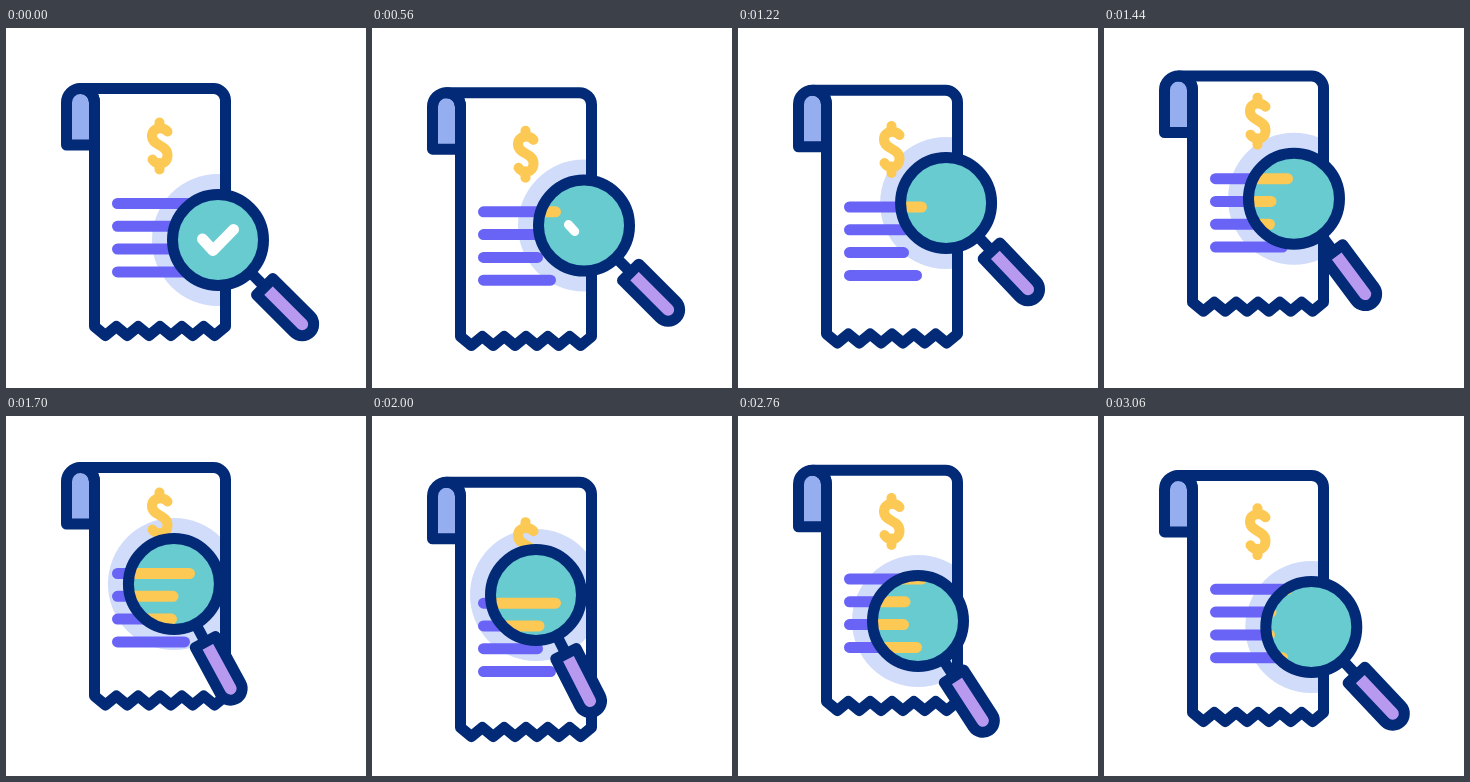
An HTML page with a canvas for the animation above (3.08 s loop, 360 by 360 pixels).

```html
<!DOCTYPE html>
<html lang="en">
<head>
<meta charset="utf-8">
<title>Receipt check</title>
<style>
html, body { margin: 0; width: 100%; height: 100%; overflow: hidden; background: #fff; }
canvas { display: block; width: 360px; height: 360px; }
</style>
</head>
<body>
<canvas id="stage"></canvas>
<script>
const LOOP = 3080, HOLD = 100, STEP = 20;
const NAVY = '#022a76', PURPLE = '#6a64f6', YELLOW = '#fdc955', TEAL = '#67cbd0',
      HALO = '#d1dcfb', ROLL = '#94aef0', GRIP = '#b79af0';

const canvas = document.getElementById('stage');
const ctx = canvas.getContext('2d');
const dpr = window.devicePixelRatio || 1;
canvas.width = canvas.height = 360 * dpr;

// Smooth curve through [time, value] keys without overshoot
function curve(keys) {
  const n = keys.length;
  const sec = keys.slice(1).map((k, i) => (k[1] - keys[i][1]) / (k[0] - keys[i][0]));
  const tan = keys.map((k, i) => {
    if (i === 0) return 0;
    if (i === n - 1) return sec[i - 1];
    const a = sec[i - 1], b = sec[i];
    return a * b <= 0 ? 0 : 2 * a * b / (a + b);
  });
  return t => {
    if (t <= keys[0][0]) return keys[0][1];
    if (t >= keys[n - 1][0]) return keys[n - 1][1];
    let i = 0;
    while (t > keys[i + 1][0]) i++;
    const h = keys[i + 1][0] - keys[i][0], u = (t - keys[i][0]) / h, v = 1 - u;
    return keys[i][1] * (1 + 2 * u) * v * v + tan[i] * h * u * v * v
         + keys[i + 1][1] * u * u * (3 - 2 * u) - tan[i + 1] * h * u * u * v;
  };
}

const clamp = u => Math.max(0, Math.min(1, u));
const sine = (t, a, b) => (1 - Math.cos(Math.PI * clamp((t - a) / (b - a)))) / 2;

// Bobbing of the print and of the torn edge
const printY = curve([[100, 0], [620, 10], [950, 28.5], [1220, 3.5], [1520, -29], [1700, -18],
  [2040, 12.5], [2300, 5], [2700, -13.5], [2760, -12.5], [3060, -2.2], [3080, -1]]);
const edgeY = curve([[100, 0], [620, 12], [950, 36], [1220, 7.5], [1520, -29], [1700, -18.5],
  [2040, 14], [2300, 4.5], [2700, -14], [2760, -13], [3060, -2], [3080, -1]]);
const lensY = curve([[100, 212], [900, 183], [1220, 175], [1700, 168], [2300, 196],
  [2470, 202], [2760, 205], [3060, 211], [3080, 211.5]]);
const lensSwing = t => sine(t, 1080, 1840) - sine(t, 2470, 3210);

function stroke(color, width, path) {
  ctx.strokeStyle = color;
  ctx.lineWidth = width;
  ctx.stroke(path);
}

function fill(color, path) {
  ctx.fillStyle = color;
  ctx.fill(path);
}

function disc(x, y, r) {
  const p = new Path2D();
  p.arc(x, y, r, 0, Math.PI * 2);
  return p;
}

function paperPath(top, edge) {
  const p = new Path2D();
  p.moveTo(74.5, 60.5 + top);
  p.lineTo(207.5, 60.5 + top);
  p.arcTo(219.5, 60.5 + top, 219.5, 72.5 + top, 12);
  for (let i = 12; i >= 0; i--)
    p.lineTo(88.5 + i * 131 / 12, (i % 2 ? 307.5 : 298.5) + edge);
  p.lineTo(88.5, 74.5 + top);
  p.arc(74.5, 74.5 + top, 14, 0, -Math.PI / 2, true);
  p.closePath();
  return p;
}

function rollPath(top) {
  const p = new Path2D();
  p.moveTo(88.5, 117 + top);
  p.lineTo(60.5, 117 + top);
  p.lineTo(60.5, 74.5 + top);
  p.arc(74.5, 74.5 + top, 14, Math.PI, 0);
  p.closePath();
  return p;
}

const rows = new Path2D();
[189, 172.5, 171, 184].forEach((end, i) => {
  rows.moveTo(111.5, 175.5 + i * 22.8);
  rows.lineTo(end - 5.5, 175.5 + i * 22.8);
});

const dollar = new Path2D('M161.5 103.5C157 98.5 146 99 146 108C146 118 161.5 116.5 161.5 127'
  + 'C161.5 137.5 150 137.5 146.5 131.5M153.5 94.5V100M153.5 135V141.5');

const grip = new Path2D();
grip.moveTo(66, -11.5);
grip.lineTo(119, -11.5);
grip.arc(119, 0, 11.5, -Math.PI / 2, Math.PI / 2);
grip.lineTo(66, 11.5);
grip.closePath();

const neck = new Path2D('M48 0H64');
const tick = new Path2D('M-15.5 -1L-5 10.5L15.5 -10.5');

function drawRows(color, y) {
  ctx.save();
  ctx.translate(0, y);
  stroke(color, 11, rows);
  ctx.restore();
}

function drawPaper(y, edge, x, ly) {
  const top = y / 2, paper = paperPath(top, edge), roll = rollPath(top);
  fill('#fff', paper);
  ctx.save();
  ctx.clip(paper);
  fill(HALO, disc(x, ly, 66));
  ctx.restore();
  fill(ROLL, roll);
  drawRows(PURPLE, y);
  ctx.save();
  ctx.translate(0, y);
  stroke(YELLOW, 10, dollar);
  ctx.restore();
  stroke(NAVY, 11, paper);
  stroke(NAVY, 11, roll);
}

function drawLens(t, x, y, turn, rowsY) {
  ctx.save();
  ctx.translate(x, y);
  ctx.rotate(Math.PI / 4 + turn);
  stroke(NAVY, 11, neck);
  fill(GRIP, grip);
  stroke(NAVY, 11, grip);
  ctx.restore();

  const glass = disc(x, y, 45.5);
  fill(TEAL, glass);
  ctx.save();
  ctx.clip(glass);
  drawRows(YELLOW, rowsY);
  ctx.restore();
  stroke(NAVY, 11, glass);

  const left = 1 - sine(t, 350, 650);
  if (left > 0) {
    ctx.save();
    ctx.translate(x, y);
    ctx.setLineDash([45 * left, 100]);
    stroke('#fff', 11 * Math.min(1, left * 4), tick);
    ctx.restore();
  }
}

function draw(t) {
  ctx.setTransform(dpr, 0, 0, dpr, 0, 0);
  ctx.fillStyle = '#fff';
  ctx.fillRect(0, 0, 360, 360);
  ctx.lineCap = ctx.lineJoin = 'round';
  const swing = lensSwing(t), x = 212 - 48 * swing, y = lensY(t), rowsY = printY(t);
  drawPaper(rowsY, edgeY(t), x, y);
  drawLens(t, x, y, swing * 18 * Math.PI / 180, rowsY);
}

const start = performance.now();
function frame() {
  const t = Math.max(0, performance.now() - start) % LOOP;
  draw(t < HOLD ? 0 : Math.floor(t / STEP) * STEP);
  requestAnimationFrame(frame);
}
frame();
</script>
</body>
</html>
```
